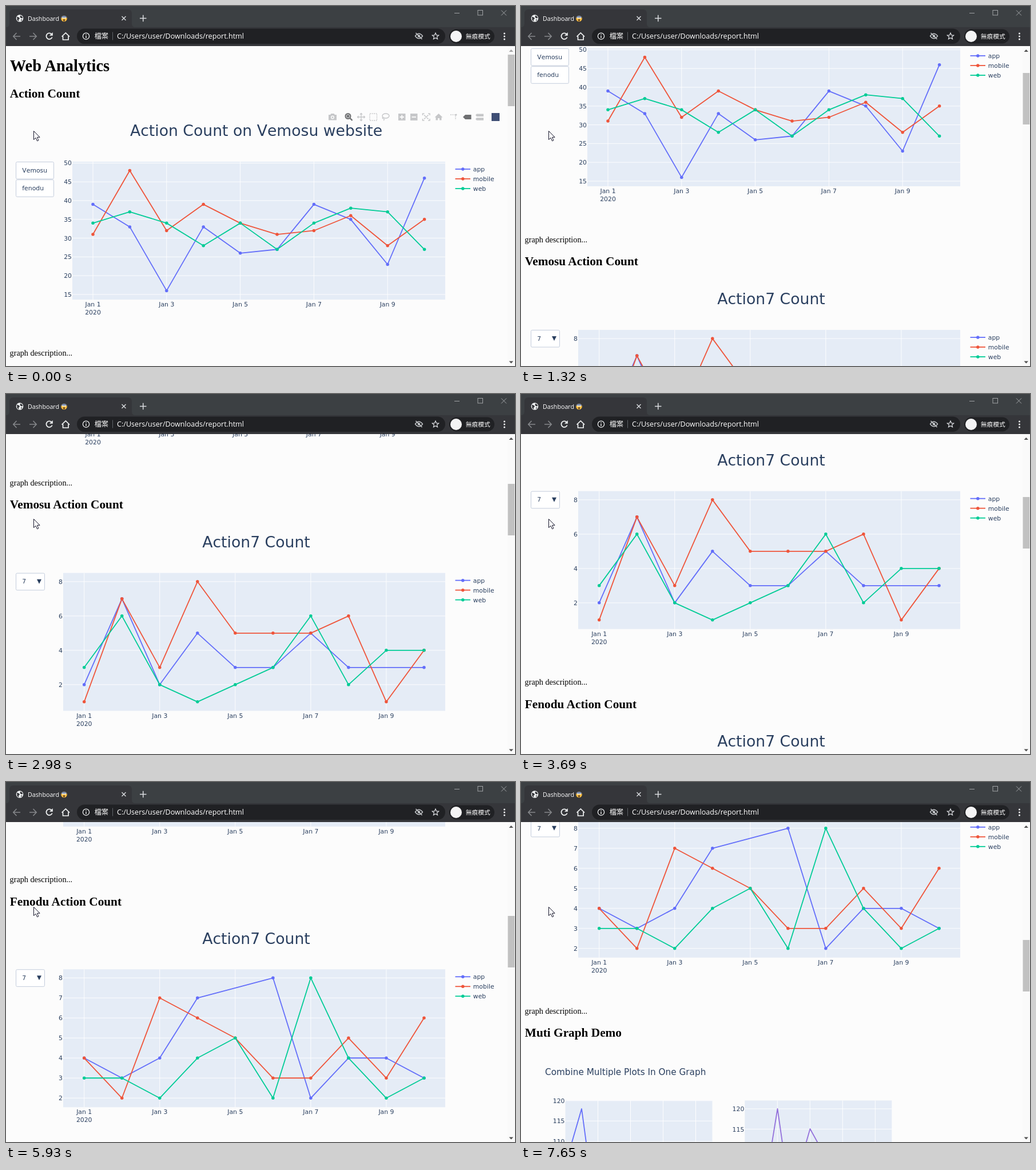
Recreate the animation shown at these times as an HTML page. Size 890 px wide and 629 px high, loop 8000 ms.

```html
<!DOCTYPE html>
<html lang="zh-Hant">
<head>
<meta charset="utf-8">
<title>Dashboard</title>
<style>
html, body { margin: 0; width: 100%; height: 100%; overflow: hidden; background: #fcfcfc; }
svg { display: block; width: 890px; height: 629px; }
text { white-space: pre; }
.plot { font-family: "DejaVu Sans", Verdana, sans-serif; font-kerning: none; fill: #2a3f5f; }
.serif { font-family: "Liberation Serif", "Times New Roman", serif; fill: #000; }
.bold { font-weight: bold; }
.ui { font-family: "Open Sans", "Noto Sans CJK TC", "Noto Sans CJK", sans-serif; fill: #fff; }
</style>
</head>
<body>
<svg id="stage" viewBox="0 0 890 629"></svg>
<script>
const NS = 'http://www.w3.org/2000/svg';
const stage = document.getElementById('stage');

function add(parent, tag, attrs = {}, content) {
  const el = document.createElementNS(NS, tag);
  for (const key in attrs) el.setAttribute(key, attrs[key]);
  if (content !== undefined) el.textContent = content;
  parent.appendChild(el);
  return el;
}
const rect = (p, x, y, width, height, fill, more) => add(p, 'rect', { x, y, width, height, fill, ...more });
const circle = (p, cx, cy, r, fill, more) => add(p, 'circle', { cx, cy, r, fill, ...more });
const shape = (p, d, fill) => add(p, 'path', { d, fill });
const stroke = (p, d, color, width = 1, more) =>
  add(p, 'path', { d, fill: 'none', stroke: color, 'stroke-width': width, ...more });
const label = (p, cls, size, x, y, str, anchor = 'start') =>
  add(p, 'text', { class: cls, 'font-size': size, x, y, 'text-anchor': anchor }, str);

const page = add(stage, 'g');
const TICK = 10.85, INK = '#2a3f5f', PAPER = '#e5ecf6';
const SERIES = [['app', '#636efa'], ['mobile', '#ef553b'], ['web', '#00cc96']];

function grid(xs, ys, left, right, top, bottom) {
  const d = xs.map(x => `M${x} ${top}V${bottom}`).concat(ys.map(y => `M${left} ${y}H${right}`));
  stroke(page, d.join(''), '#fff', 0.9);
}

// One line chart: `day0`/`day` place the dates, `base`/`unit` place the values.
function chart({ title, titleY, left, top, day0, day, base, unit, ticks, data }) {
  const right = 768, bottom = top + 241;
  const px = i => day0 + i * day, py = v => base - v * unit;
  const dates = [0, 2, 4, 6, 8];
  rect(page, left, top, right - left, bottom - top, PAPER);
  grid(dates.map(px), ticks.map(py), left, right, top, bottom);
  label(page, 'plot', 26.67, 437.5, titleY, title, 'middle');
  ticks.forEach(v => label(page, 'plot', TICK, left - 1, py(v) + 4, v, 'end'));
  dates.forEach(i => label(page, 'plot', TICK, px(i), bottom + 12, 'Jan ' + (i + 1), 'middle'));
  label(page, 'plot', TICK, px(0), bottom + 26, '2020', 'middle');
  SERIES.forEach(([name, color], s) => {
    const points = data[s].map((v, i) => v === null ? null : [px(i), py(v)]).filter(Boolean);
    stroke(page, 'M' + points.join('L'), color, 1.8, { 'stroke-linejoin': 'round' });
    points.forEach(([x, y]) => circle(page, x, y, 2.75, color));
    const y = top + 13 + s * 17;
    stroke(page, `M785.5 ${y}H812`, color, 1.8);
    circle(page, 798.8, y, 2.75, color);
    label(page, 'plot', TICK, 816.8, y + 4, name);
  });
}

function button(y, width, str) {
  rect(page, 17.5, y, width, 29.6, '#fff', { rx: 2, stroke: '#bec8d9', 'stroke-width': 0.9 });
  label(page, 'plot', TICK, 28.3, y + 18.3, str);
}
function dropdown(y) {
  button(y, 50, '7');
  shape(page, `M54 ${y + 10.5}h8l-4 8z`, INK);
}
const heading = (y, str) => label(page, 'serif bold', 21.3, 6.8, y, str);
const note = y => label(page, 'serif', 14.2, 6.6, y, 'graph description...');

function modebar() {
  const pale = '#c6c7c9', dark = '#6f7072';
  shape(page, 'M564 190h3l1.5-2h5l1.5 2h3v9.5h-14z', pale);
  circle(page, 571, 194.5, 3, '#fcfcfc');
  circle(page, 571, 194.5, 1.5, pale);
  circle(page, 598, 192.5, 4.5, pale, { stroke: dark, 'stroke-width': 2 });
  stroke(page, 'M601.5 196L605.5 200', dark, 2.4);
  rect(page, 596, 190.5, 4, 4, dark);
  stroke(page, 'M614.5 194h13M621 187.5v13M616.5 192l-2 2 2 2M625.5 192l2 2-2 2M619 189.5l2-2 2 2M619 198.5l2 2 2-2', pale, 1.3);
  rect(page, 636, 188, 12.5, 12, 'none', { stroke: pale, 'stroke-width': 1.4, 'stroke-dasharray': '2 1.5' });
  add(page, 'ellipse', { cx: 664, cy: 192, rx: 6, ry: 4, fill: 'none', stroke: pale, 'stroke-width': 1.4 });
  stroke(page, 'M659 194q-2 2 1 3t0 3', pale, 1.3);
  rect(page, 686, 188, 12.5, 12, pale);
  stroke(page, 'M688.5 194h7.5M692.25 190.25v7.5', '#fcfcfc', 1.8);
  rect(page, 707, 188, 12.5, 12, pale);
  stroke(page, 'M709.5 194h7.5', '#fcfcfc', 1.8);
  stroke(page, 'M728.5 191v-3h3M738 188h3v3M741 197v3h-3M731.5 200h-3v-3M731 190.5l7.5 7M738.5 190.5l-7.5 7', pale, 1.5);
  shape(page, 'M749.5 194.5l7-6.5 7 6.5h-2v5h-3.5v-3.5h-3v3.5h-3.5v-5z', pale);
  stroke(page, 'M777 190h9v9', pale, 1.5, { 'stroke-dasharray': '2 1.5' });
  circle(page, 787, 190, 1.5, pale);
  shape(page, 'M799 194l4-4h10.5v8h-10.5z', dark);
  shape(page, 'M821 190.5l2-2h12v4.5h-12zM821 197.5l2-2.2h12v4.5h-12z', pale);
  rect(page, 849, 187, 14, 14, '#3f4f75');
}

function buildPage() {
  label(page, 'serif bold', 28.4, 6.8, 114.3, 'Web Analytics');
  heading(160, 'Action Count');
  chart({
    title: 'Action Count on Vemosu website', titleY: 227.3, left: 116, top: 272,
    day0: 152, day: 64.4, base: 602.3, unit: 6.557, ticks: [15, 20, 25, 30, 35, 40, 45, 50],
    data: [[39, 33, 16, 33, 26, 27, 39, 35, 23, 46],
           [31, 48, 32, 39, 34, 31, 32, 36, 28, 35],
           [34, 37, 34, 28, 34, 27, 34, 38, 37, 27]]
  });
  modebar();
  button(272.5, 66, 'Vemosu');
  button(303.7, 66, 'fenodu');
  note(611);

  const small = { title: 'Action7 Count', left: 100, day0: 136.7, day: 66.03 };
  heading(651, 'Vemosu Action Count');
  chart({
    ...small, titleY: 718.8, top: 763.9, base: 1019.1, unit: 30, ticks: [2, 4, 6, 8],
    data: [[2, 7, 2, 5, 3, 3, 5, 3, null, 3],
           [1, 7, 3, 8, 5, 5, 5, 6, 1, 4],
           [3, 6, 2, 1, 2, 3, 6, 2, 4, 4]]
  });
  dropdown(764.4);
  note(1102.5);

  heading(1143, 'Fenodu Action Count');
  chart({
    ...small, titleY: 1209.8, top: 1254.3, base: 1549.3, unit: 35, ticks: [2, 3, 4, 5, 6, 7, 8],
    data: [[4, 3, 4, 7, null, 8, 2, 4, 4, 3],
           [4, 2, 7, 6, 5, 3, 3, 5, 3, 6],
           [3, 3, 2, 4, 5, 2, 8, 4, 2, 3]]
  });
  dropdown(1254.8);
  note(1593);

  heading(1633.3, 'Muti Graph Demo');
  label(page, 'plot', 15.25, 42, 1700.7, 'Combine Multiple Plots In One Graph');
  subplot(77.5, 1745.3, [120, 115, 110], '#636efa', 'M89 1818L106 1759.500L114.500 1822');
  subplot(391.3, 1759.5, [120, 115], '#9370db', 'M438 1824L448.500 1759.500L457.500 1822M497.500 1822L505.500 1794.500L519 1819');
}

function subplot(left, y120, ticks, color, line) {
  const right = left + 257, top = 1745, bottom = 1900;
  const py = v => y120 + (120 - v) * 7.1;
  rect(page, left, top, right - left, bottom - top, PAPER);
  grid([1, 2, 3, 4].map(i => left + i * 57), ticks.map(py), left, right, top, bottom);
  ticks.forEach(v => label(page, 'plot', TICK, left - 1, py(v) + 4, v, 'end'));
  stroke(page, line, color, 1.8, { 'stroke-linejoin': 'round' });
}

function buildBrowser() {
  const white = '#f1f3f4', grey = '#85878a', bar = '#35363a', well = '#202124';
  rect(stage, 0, 0, 890, 38, '#3c4043');
  rect(stage, 0, 37, 890, 33, bar);
  shape(stage, 'M0 37Q6 37 6 31V13Q6 6 13 6H213Q220 6 220 13V31Q220 37 226 37Z', bar);

  circle(stage, 24, 21.5, 6.3, white);
  shape(stage, 'M19 18.5l4 1.5 1 2.5-2 1 .5 3.5-3-2.5zM25 16.5l3 1.5 1.5 3-3 .5-2-2zM26 23.5l2.5 0-2 3z', bar);
  label(stage, 'ui', 10.7, 38, 25.7, 'Dashboard');
  circle(stage, 101.5, 22, 5.3, '#f5b93f');
  shape(stage, 'M96.5 20.5a5.3 5.3 0 0 1 10 0z', '#6f87b5');
  circle(stage, 99.7, 21, 1.2, '#fff');
  circle(stage, 103.3, 21, 1.2, '#fff');
  add(stage, 'ellipse', { cx: 101.5, cy: 24.8, rx: 1.3, ry: 1.9, fill: '#4c3020' });
  stroke(stage, 'M202.5 18l7 7M209.5 18l-7 7', '#dadce0', 1.4);
  stroke(stage, 'M234 21.5h11.5M239.75 15.75v11.5', '#dadce0', 1.5);
  stroke(stage, 'M784 12.5h9', '#a0a3a6');
  rect(stage, 825, 7.5, 8.5, 8.5, 'none', { stroke: '#a0a3a6' });
  stroke(stage, 'M866 7.5l9 9M875 7.5l-9 9', '#a0a3a6');

  stroke(stage, 'M25 53H13M18.5 47L12.8 53l5.7 6M41 53h12M47.5 47l5.7 6-5.7 6', grey, 1.6);
  stroke(stage, 'M80 49.5a5.3 5.3 0 1 0 .7 5', white, 1.8);
  shape(stage, 'M81.8 46v5.8h-5.8z', white);
  stroke(stage, 'M97.5 53.5l6.8-6.5 6.8 6.5M99.5 52.5v6.5h9.6v-6.5', white, 1.7);

  rect(stage, 124, 39.5, 644, 26.5, well, { rx: 13.2 });
  circle(stage, 140, 52.7, 5.6, 'none', { stroke: white, 'stroke-width': 1.3 });
  stroke(stage, 'M140 49.3v1.4M140 52v4', white, 1.4);
  label(stage, 'ui', 12.2, 154.7, 57, '檔案');
  stroke(stage, 'M186.5 45.5v14', '#5f6368');
  label(stage, 'ui', 12.6, 194, 57, 'C:/Users/user/Downloads/report.html');
  stroke(stage, 'M715.5 52.5q6.5-8.5 13 0q-6.5 8.5-13 0z', '#c4c7ca', 1.4);
  circle(stage, 722, 52.5, 2.2, '#c4c7ca');
  stroke(stage, 'M716.5 47l11 11', '#c4c7ca', 1.5);
  const star = Array.from({ length: 10 }, (_, i) => {
    const a = i * Math.PI / 5, r = i % 2 ? 2.7 : 6;
    return [751 + r * Math.sin(a), 53 - r * Math.cos(a)];
  });
  stroke(stage, 'M' + star.join('L') + 'Z', '#dadce0', 1.2);
  rect(stage, 775, 40.5, 79, 25, well, { rx: 12.5 });
  circle(stage, 787, 53, 10, '#f4f4f5');
  label(stage, 'ui', 10.75, 803.8, 56.8, '無痕模式');
  [48, 53, 58].forEach(y => circle(stage, 871.5, y, 1.5, white));
}

buildPage();
buildBrowser();

rect(stage, 877, 70, 13, 559, '#fafafa');
const upArrow = shape(stage, 'M879.5 80h7.5l-3.75-4z', '#505050');
shape(stage, 'M879.5 620.5h7.5l-3.75 4z', '#505050');
const thumb = rect(stage, 877.5, 85, 11.8, 90, '#c1c1c1');
add(stage, 'path', {
  d: 'M48.5 218.5v15l3.5-3.2 2.5 5.5 2.4-1-2.4-5.5h4.6z',
  fill: '#fff', stroke: '#14142a', 'stroke-width': 1
});

// [time in ms, wheel notches scrolled]
const LOOP = 8000, NOTCH = 118.85;
const SCROLL = [
  [0, 0], [120, .06], [240, .93], [360, 1], [1320, 1.666], [1440, 2], [2120, 2.6], [2240, 3],
  [2980, 3.797], [3100, 4], [3550, 4.13], [3690, 5], [4430, 5.55], [4580, 6], [5200, 6.066],
  [5360, 7], [5930, 7.8], [6080, 8], [6540, 8.07], [6660, 8.9], [6810, 9], [7410, 9.07],
  [7530, 9.9], [7650, 10]
];
const start = performance.now();

function draw(now) {
  const t = Math.max(0, now - start) % LOOP;
  const y = SCROLL.filter(([time]) => time <= t).pop()[1] * NOTCH;
  page.setAttribute('transform', `translate(0 ${-y})`);
  thumb.setAttribute('y', 85 + Math.round(y * 0.1605));
  upArrow.setAttribute('fill', y ? '#505050' : '#a3a3a3');
  requestAnimationFrame(draw);
}
draw(start);
</script>
</body>
</html>
```
